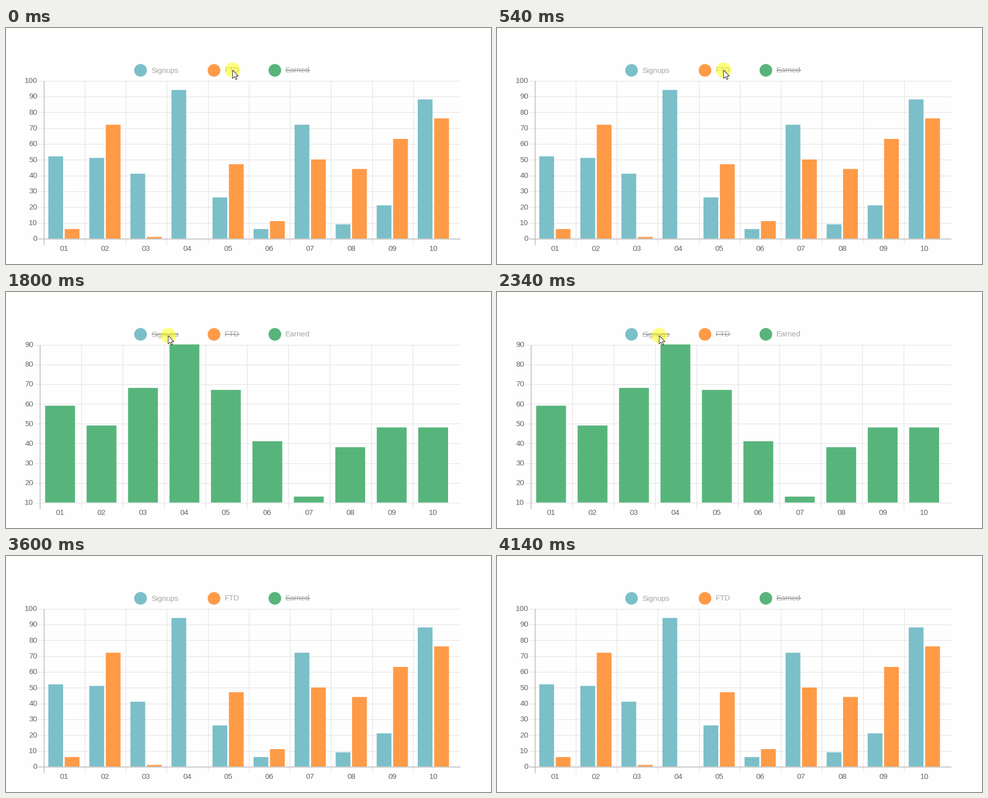
Animation, 960 px wide and 468 px high, one loop 4500 ms. Source, as a matplotlib script:

```python
import matplotlib.pyplot as plt
from matplotlib.animation import FuncAnimation
from matplotlib.patches import Circle, Polygon, Rectangle

W, H, DPI = 960, 468, 100
PX = 72 / DPI
TOP, BASE, RIGHT, GRID_END = 104.5, 418, 886.5, 899
GRID, AXIS, LABEL, LEGEND = "#e3e3e3", "#acacac", "#666666", "#a6a6a6"

# name: colour, legend disc x, text x, text end, values
SERIES = {
    "Signups": ("#7bbfc9", 266.3, 287.5, 342, [52, 51, 41, 94, 26, 6, 72, 9, 21, 88]),
    "FTD": ("#ff9a47", 411.7, 432.8, 462.3, [6, 72, 1, 0, 47, 11, 50, 44, 63, 76]),
    "Earned": ("#57b57b", 532.2, 553, 602, [59, 49, 68, 90, 67, 41, 13, 38, 48, 48]),
}

# visible series and pointer tip for each step
STEPS = [
    (("Signups", "FTD"), (448.5, 83.5)),
    (("Signups", "Earned"), (321, 86.5)),
    (("Earned",), (321, 86.5)),
    (("Signups", "Earned"), (579.5, 81.5)),
    (("Signups", "FTD"), None),
]
ARROW = [(0, 0), (0, 16.5), (3.8, 13), (6.4, 18.6), (8.8, 17.6),
         (6.3, 12), (11.4, 12)]

fig = plt.figure(figsize=(W / DPI, H / DPI), dpi=DPI, facecolor="#fefefe")
ax = fig.add_axes([0, 0, 1, 1])


def line(x0, y0, x1, y1, color, width=1.2, z=1):
    ax.plot([x0, x1], [y0, y1], color=color, lw=width * PX, zorder=z,
            solid_capstyle="butt")


def text(x, y, s, color, ha):
    ax.text(x, y, s, color=color, ha=ha, va="baseline",
            family="Liberation Sans", size=15 * PX, zorder=4)


def draw_grid(left, slot, low, high):
    for v in range(low, high + 1, 10):
        y = BASE - (v - low) / (high - low) * (BASE - TOP)
        line(left - 11, y, GRID_END, y, GRID)
        text(left - 12, y + 4.5, str(v), LABEL, "right")
    for i in range(10):
        x = int(left + i * slot) + 0.5
        line(x, TOP, x, 430, GRID)
        text(left + (i + 0.5) * slot, 442, f"{i + 1:02d}", LABEL, "center")
    line(left + 0.5, TOP, left + 0.5, 430, AXIS, z=2)
    if low == 0:
        line(left - 11, BASE, GRID_END, BASE, AXIS, z=2)


def draw_bars(shown, left, slot, low, high):
    step = 0.8 * slot / len(shown)
    for k, name in enumerate(shown):
        color, values = SERIES[name][0], SERIES[name][-1]
        for i, v in enumerate(values):
            x = left + (i + 0.1) * slot + (k + 0.05) * step
            h = (v - low) / (high - low) * (BASE - TOP)
            ax.add_patch(Rectangle((x, BASE - 0.5 - h), 0.9 * step, h,
                                   fc=color, lw=0, zorder=3, snap=False))


def draw_legend(shown):
    for name, (color, disc, start, end, _) in SERIES.items():
        ax.add_patch(Circle((disc, 84), 12.5, fc=color, lw=0, zorder=4))
        text(start, 88.5, name, LEGEND, "left")
        if name not in shown:
            line(start, 83.5, end, 83.5, LEGEND, 2, 4)


def draw_pointer(tip):
    x, y = tip
    ax.add_patch(Circle(tip, 15.2, fc="#ffff00", alpha=0.5, lw=0, zorder=5))
    ax.add_patch(Polygon([(x + dx, y + dy) for dx, dy in ARROW], fc="white",
                         ec="#222222", lw=PX, joinstyle="miter", zorder=6))


def draw(i):
    ax.clear()
    ax.set(xlim=(0, W), ylim=(H, 0))
    ax.axis("off")
    shown, tip = STEPS[i]
    left, low, high = (66, 10, 90) if len(shown) == 1 else (74, 0, 100)
    slot = (RIGHT - left) / 10
    draw_grid(left, slot, low, high)
    draw_bars(shown, left, slot, low, high)
    draw_legend(shown)
    if tip:
        draw_pointer(tip)
    return []


anim = FuncAnimation(fig, draw, frames=len(STEPS), interval=900, repeat=True,
                     init_func=lambda: [])
plt.show()
```
